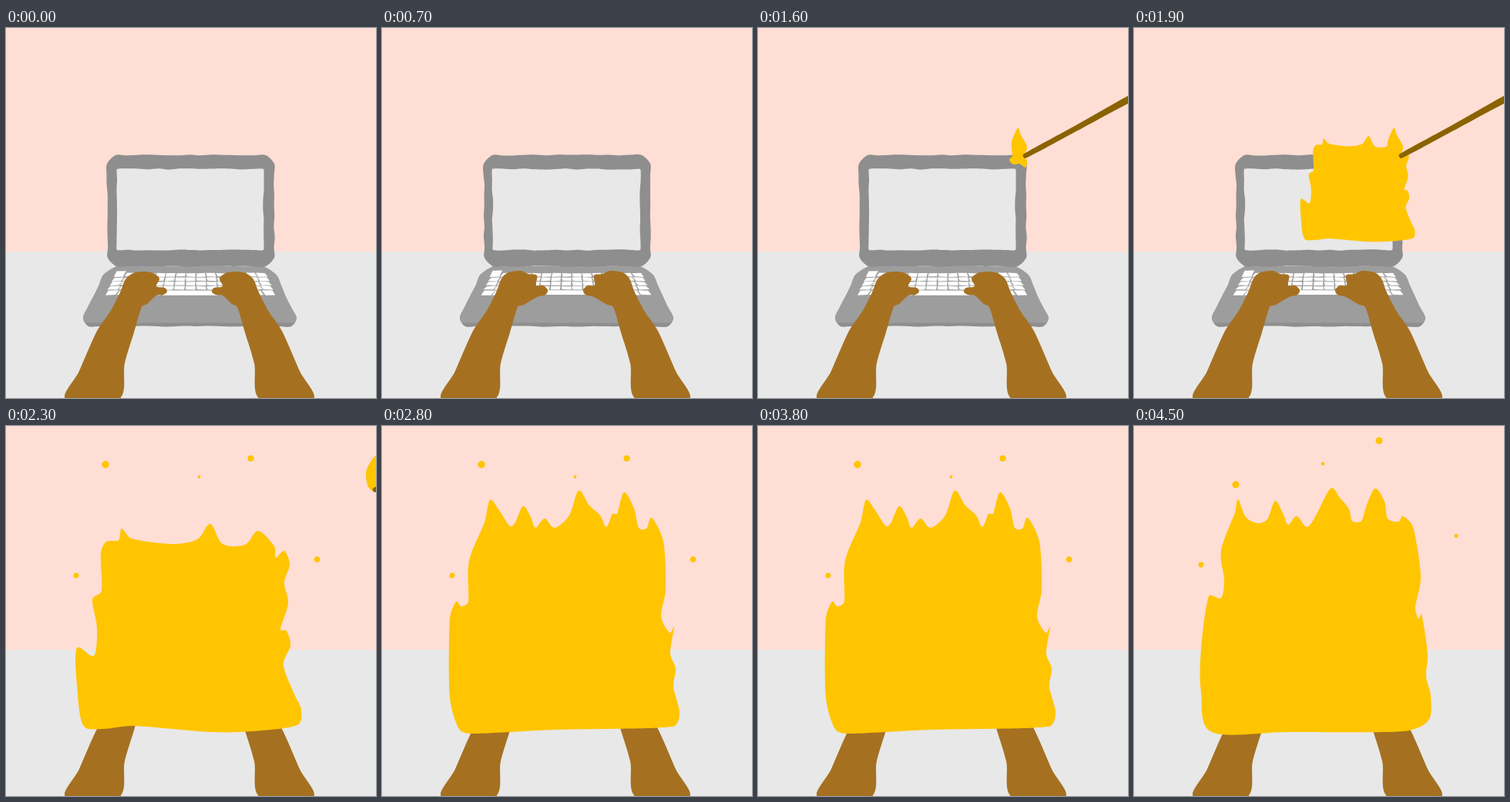
Recreate the animation shown at these times as an HTML page with a canvas. Size 480 by 480 pixels, loop 4600 ms.

```html
<!DOCTYPE html>
<html lang="en">
<head>
<meta charset="utf-8">
<title>Laptop on fire</title>
<style>
html, body { margin: 0; width: 100%; height: 100%; overflow: hidden; background: #e8e8e8; }
canvas { display: block; width: 100vw; height: 100vh; }
</style>
</head>
<body>
<canvas id="stage" width="480" height="480"></canvas>
<script>
const ctx = document.getElementById('stage').getContext('2d');
const LOOP = 4600, STEP = 100;
const WALL = '#ffded5', DESK = '#e8e8e8', LID = '#8e8e8e', BASE = '#9d9d9d';
const KEY = '#ffffff', SKIN = '#a57121', FIRE = '#ffc500', WOOD = '#8a6300';

// Left arm; the right one is its mirror image.
const OUTER = [78, 482, 95, 445, 118, 393, 135, 368, 148, 343];
const INNER = [176, 362, 166, 395, 154, 435, 146, 482];
const RESTING = [155, 326, 165, 318, 178, 316, 191, 318, 199, 325, 195, 335, 206, 337, 209, 342, 204, 346, 195, 347, 183, 358];
const REACHING = [155, 325, 164, 317, 180, 315, 190, 319, 201, 321, 200, 334, 209, 334, 215, 340, 212, 346, 201, 349, 184, 359];

const FLAME_A = [
  100, 393, 88, 352, 88, 250, 96, 228, 103, 234, 112, 228, 113, 175, 133, 125, 140, 96, 151, 108, 166, 130,
  173, 125, 183, 104, 193, 118, 199, 132, 211, 120, 224, 132, 243, 116, 255, 84, 269, 103, 283, 116, 291, 131,
  299, 114, 305, 114, 314, 86, 327, 107, 333, 132, 343, 133, 350, 119, 365, 150, 368, 212, 362, 247, 373, 268,
  379, 260, 374, 295, 381, 315, 378, 338, 386, 372, 377, 390, 225, 394, 117, 399];
const FLAME_B = [
  101, 397, 87, 345, 87, 290, 97, 221, 113, 223, 117, 200, 113, 162, 131, 112, 135, 95, 145, 118, 160, 126,
  173, 121, 183, 97, 193, 113, 200, 128, 211, 117, 224, 131, 235, 118, 255, 81, 267, 93, 279, 108, 283, 123,
  295, 123, 302, 102, 313, 81, 325, 98, 329, 120, 343, 124, 349, 117, 362, 131, 372, 195, 365, 235, 369, 250,
  373, 244, 381, 295, 379, 325, 385, 350, 382, 382, 350, 396, 200, 397];
const YOUNG_FLAME = [
  100, 388, 92, 335, 92, 288, 114, 298, 118, 262, 112, 225, 124, 214, 123, 165, 130, 150, 146, 148, 150, 133,
  163, 146, 215, 153, 248, 147, 265, 127, 281, 153, 310, 154, 327, 136, 348, 156, 350, 171, 361, 162, 368, 180,
  361, 203, 366, 230, 356, 264, 364, 266, 369, 285, 360, 310, 375, 350, 383, 368, 378, 388, 320, 396, 265, 397,
  165, 389, 125, 393];

// x, y, radius
const SPARKS_A = [129, 50, 4.7, 317.5, 42, 4, 250.5, 66, 1.9, 403.5, 173, 3.8, 91, 194, 3.4];
const SPARKS_B = [132, 76, 4.6, 318, 19, 4.5, 245, 49, 2.3, 418, 142.5, 2.5, 87, 180, 3.4];

// Relative to the tip of the match.
const CARRIED = [4, -45, -5, -35, -10, -22, -7, -4, 4, 2, 14, -13, 10, -33];
const TOUCHING = [-8, -36, -16, -18, -15, 0, -19, 5, -14, 11, -6, 10, 2, 15, 4, 6, 0, 1, 4, -12, -4, -27];
const STICK = [-1, -2, 66, -39, 135, -78, 205, -114, 205, -104, 135, -68, 66, -31, 2, 3];

const pairs = flat => Array.from({ length: flat.length / 2 }, (_, i) => [flat[2 * i], flat[2 * i + 1]]);
const random = seed => () => (seed = (seed * 16807) % 2147483647) / 2147483647;

// Cuts each corner at distance r.
function cut(pts, r) {
  const n = pts.length;
  const toward = ([x, y], [u, v]) => {
    const d = Math.hypot(u - x, v - y);
    return [x + (u - x) * r / d, y + (v - y) * r / d];
  };
  return pts.flatMap((p, i) => [toward(p, pts[(i + n - 1) % n]), toward(p, pts[(i + 1) % n])]);
}

// Splits the edges and nudges the new points for a hand-drawn line.
function rough(pts, seed, amount = 0.8, gap = 14) {
  const rnd = random(seed);
  const nudge = () => (rnd() * 2 - 1) * amount;
  return pts.flatMap(([x, y], i) => {
    const [u, v] = pts[(i + 1) % pts.length];
    const n = Math.max(1, Math.round(Math.hypot(u - x, v - y) / gap));
    return Array.from({ length: n }, (_, k) =>
      k ? [x + (u - x) * k / n + nudge(), y + (v - y) * k / n + nudge()] : [x, y]);
  });
}

// Closed smooth curve through the points.
function blob(pts, color, bend = 0.16) {
  const n = pts.length, at = i => pts[(i + n) % n];
  const handle = (i, side) => {
    const [x, y] = at(i), a = at(i - 1), c = at(i + 1), next = at(i + side);
    const span = Math.hypot(c[0] - a[0], c[1] - a[1]) || 1;
    const len = side * Math.min(span * bend, 0.35 * Math.hypot(next[0] - x, next[1] - y)) / span;
    return [x + (c[0] - a[0]) * len, y + (c[1] - a[1]) * len];
  };
  ctx.fillStyle = color;
  ctx.beginPath();
  ctx.moveTo(...pts[0]);
  for (let i = 0; i < n; i++) ctx.bezierCurveTo(...handle(i, 1), ...handle(i + 1, -1), ...at(i + 1));
  ctx.fill();
}

function keys(pose) {
  const rnd = random(91 + pose * 40);
  const jit = () => (rnd() - 0.5) * 0.9;
  const count = 15;
  ctx.fillStyle = KEY;
  for (let row = 0; row < 5; row++) {
    const left = 142 - row * 2.8, right = 339 + row * 2.4, pitch = (right - left) / count;
    const top = 318 + row * 5.6, bottom = top + (row === 4 ? 6 : 4.6);
    for (let k = 0; k < count; k++) {
      const space = row === 4 && k === 5;
      const x = left + k * pitch, w = pitch * (space ? 5 : 1) - 1.5;
      const y = row + k === 0 ? top - 3 : top;
      const lean = (x + w / 2 - 240) * 0.022;
      ctx.beginPath();
      ctx.moveTo(x - lean + jit(), y + jit());
      ctx.lineTo(x + w - lean + jit(), y + jit());
      ctx.lineTo(x + w + lean + jit(), bottom + jit());
      ctx.lineTo(x + lean + jit(), bottom + jit());
      ctx.fill();
      if (space) k += 4;
    }
  }
}

function laptop(pose) {
  const p = pose;
  const base = rough(cut([[132 + p, 309], [345 + p, 309], [382 + p, 387], [95 + p, 387]], 12), 17 + p, 0.6);
  blob(base, LID);
  ctx.save();
  ctx.beginPath();
  ctx.rect(0, 300, 480, 82.5);
  ctx.clip();
  blob(base, BASE);
  ctx.restore();
  blob(rough(cut([[131 + p, 165], [348, 165], [348, 309], [132 + p, 309]], 11), 5 + p), LID);
  blob(rough([[144 - p, 183], [334 + p, 183], [334 + p, 288], [144, 288]], 31 + p), DESK, 0.08);
  keys(pose);
}

function arms(pose) {
  const arm = pairs([...OUTER, ...(pose ? REACHING : RESTING), ...INNER]);
  blob(arm, SKIN);
  blob(arm.map(([x, y]) => [476 - x, y]), SKIN);
}

function sparks(pose) {
  const list = pose ? SPARKS_B : SPARKS_A;
  ctx.fillStyle = FIRE;
  for (let i = 0; i < list.length; i += 3) {
    ctx.beginPath();
    ctx.arc(list[i], list[i + 1], list[i + 2], 0, Math.PI * 2);
    ctx.fill();
  }
}

function fire(step, pose) {
  if (step < 17) return;
  if (step < 24) {
    const s = Math.pow((step - 16) / 7, 0.8);
    blob(pairs(YOUNG_FLAME).map(([x, y]) => [345 + (x - 345) * s, 154 + (y - 154) * s]), FIRE);
    if (step > 21) sparks(1 - pose);
  } else {
    blob(pairs(pose ? FLAME_B : FLAME_A), FIRE);
    sparks(pose);
  }
}

// near: 0 at the edge of the stage, 1 touching the laptop
function match(step) {
  if (step < 11 || step > 23) return;
  const near = Math.min(1, (step - 11) / 3, (23 - step) / 3);
  ctx.save();
  ctx.translate(477 - 132 * near, 83 + 83 * near);
  blob(pairs(near === 1 ? TOUCHING : CARRIED), FIRE);
  blob(pairs(STICK), WOOD);
  ctx.restore();
}

function draw(step) {
  const pose = step % 2;
  ctx.fillStyle = WALL;
  ctx.fillRect(0, 0, 480, 290);
  ctx.fillStyle = DESK;
  ctx.fillRect(0, 290, 480, 190);
  laptop(pose);
  arms(pose);
  fire(step, pose);
  match(step);
}

const start = performance.now();
let shown = -1;
function tick() {
  const step = Math.floor(((performance.now() - start) % LOOP) / STEP);
  if (step !== shown) draw(shown = step);
  requestAnimationFrame(tick);
}
tick();
</script>
</body>
</html>
```
